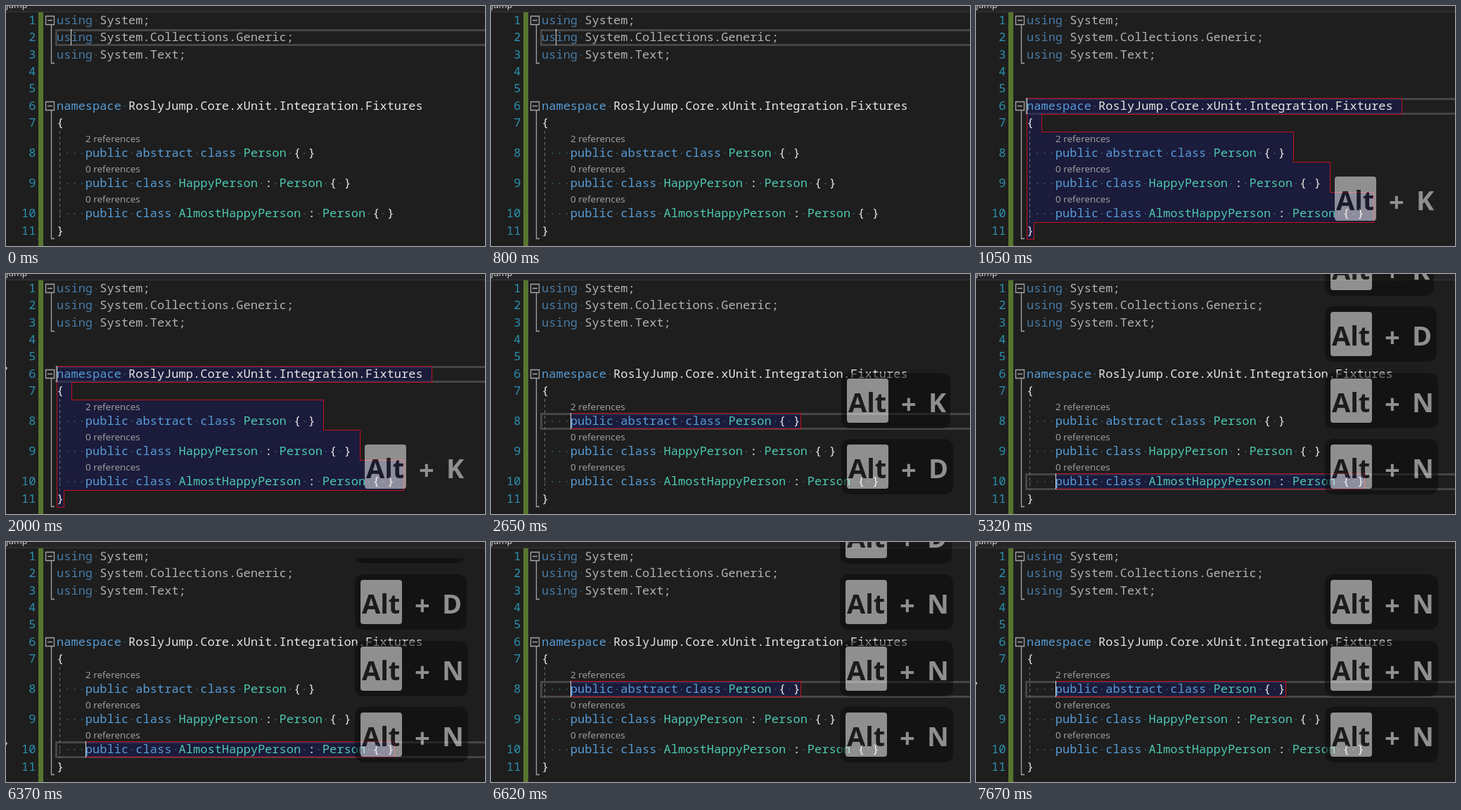
An HTML page for the animation above (8 s loop, 681 px wide and 342 px high).

```html
<!DOCTYPE html>
<html lang="en">
<head>
<meta charset="utf-8">
<title>Code navigation</title>
<style>
  html, body { margin: 0; width: 100%; height: 100%; overflow: hidden; background: #1e1e1e; }
  svg { display: block; width: 681px; height: 342px; }
  .code { font: 500 17.03px "Noto Sans Mono", monospace; fill: #e6e6e6; }
  .number { fill: #2b91af; text-anchor: end; }
  .keyword { fill: #569cd6; }
  .type { fill: #4ec9b0; }
  .space { fill: #2c5468; }
  .unused { opacity: .74; }
  .lens { font: 13.5px "Open Sans", sans-serif; fill: #a6a6a6; }
  .outline { fill: none; stroke: #a5a5a5; stroke-width: 1.3; }
  .key { font: bold 38px "Open Sans", sans-serif; fill: #fff; }
</style>
</head>
<body>
<svg viewBox="0 0 681 342">
  <rect width="681" height="342" fill="#1e1e1e"/>
  <rect width="681" height="8" fill="#252526"/>
  <rect y="8" width="681" height="1" fill="#38383c"/>
  <text y="3" font-family="Open Sans, sans-serif" font-size="12.5" fill="#ddd">Jump</text>
  <g id="under"></g>
  <path d="M76.5 178V308" stroke="#707070" stroke-dasharray="4 4"/>
  <rect x="46" y="9" width="7" height="333" fill="#577430"/>
  <g class="outline">
    <path d="M56.5 14.5h12v12h-12zM59 20.5h7M64.5 27V81.5H69"/>
    <path d="M56.5 136.5h12v12h-12zM59 142.5h7M64.5 149V331.5H69"/>
  </g>
  <g id="code" class="code"></g>
  <g id="over"></g>
</svg>
<script>
const LOOP = 8000;
const CHAR = 10.218, TEXT_X = 72;

// Vertical centre of each editor line
const lineY = [0, 20, 44, 69, 93, 117, 142, 166, 209, 252, 295, 320];
const source = [
  '', 'using System;', 'using System.Collections.Generic;', 'using System.Text;', '', '',
  'namespace RoslyJump.Core.xUnit.Integration.Fixtures', '{',
  '    public abstract class Person { }',
  '    public class HappyPerson : Person { }',
  '    public class AlmostHappyPerson : Person { }', '}'
];
const lenses = { 8: '2 references', 9: '0 references', 10: '0 references' };

const steps = [
  { at: 0, line: 2, keys: '' },
  { at: 1050, line: 6, keys: 'K', bare: true },
  { at: 2650, line: 8, keys: 'KD' },
  { at: 4140, line: 9, keys: 'KDN' },
  { at: 5200, line: 10, keys: 'KDNN', bare: true },
  { at: 5320, line: 10, keys: 'KDNN' },
  { at: 6000, line: 10, keys: 'KDNN', fade: .25 },
  { at: 6120, line: 10, keys: 'KDNN', fade: 0 },
  { at: 6620, line: 8, keys: 'DNNN' },
  { at: 7520, line: 8, keys: 'DNNN', fade: .25 },
  { at: 7670, line: 8, keys: 'NNN' }
];
const caretOff = [[270, 800], [1480, 2000], [3090, 3610], [4670, 5200], [5750, 6370], [7150, 7670]];
const hintOn = [[1600, 2650], [3090, 4140], [4670, 5200], [5750, 6620], [7150, 8000]];
const within = (ranges, t) => ranges.some(([from, to]) => t >= from && t < to);

const byId = id => document.getElementById(id);
const rect = (x, y, w, h, attrs) => `<rect x="${x}" y="${y}" width="${w}" height="${h}" ${attrs}/>`;
const span = (cls, text) => `<tspan class="${cls}">${text}</tspan>`;

function highlight(text) {
  return text.replace(/\b(using|namespace|public|abstract|class)\b|(\w*Person)|( +)/g,
    (all, keyword, type) => keyword ? span('keyword', all)
      : type ? span('type', all) : span('space', '·'.repeat(all.length)));
}

byId('code').innerHTML = source.map((text, i) => {
  if (!i) return '';
  const base = lineY[i] + 6;
  const lens = lenses[i] ? `<text class="lens" x="113" y="${lineY[i] - 15.5}">${lenses[i]}</text>` : '';
  return `<text class="number" x="42.5" y="${base}">${i}</text>${lens}
    <text class="${i < 4 ? 'unused' : ''}" x="${TEXT_X}" y="${base}">${highlight(text)}</text>`;
}).join('');

function selection(line) {
  const style = 'fill="#17175a" fill-opacity=".48" stroke="#c4101a"';
  if (line === 2) return '';
  if (line === 6) {
    return `<path ${style} d="M72.5 131.5H605.5V154.5H93.5V179.5H451.5V222.5H503.5V265.5H565.5V308.5H82.5V332.5H72.5Z"/>`;
  }
  const width = Math.round((source[line].length - 4) * CHAR);
  return rect(113.5, lineY[line] - 10.5, width, 22, style);
}

const popupWidth = { K: 155, D: 159, N: 161 };

function popup(key, x, y, showBack, contentAlpha) {
  const back = showBack ? rect(0, 0, popupWidth[key], 79, 'rx="12" fill="#0a0a0a"') : '';
  return `<g transform="translate(${x} ${y})" opacity="${.5 * contentAlpha}">${back}
    ${rect(8, 8, 59, 63, 'rx="4" fill="#fff"')}
    <text class="key" x="10" y="56" style="fill:#1a1a1a">Alt</text>
    <text class="key" x="85" y="58">+</text>
    <text class="key" x="124" y="56">${key}</text></g>`;
}

function popups({ keys, bare, fade = 1 }) {
  const left = 657 - Math.max(...[...keys].map(k => popupWidth[k]));
  return [...keys].map((key, i) => {
    const last = i === keys.length - 1;
    const y = 235 - Math.floor(94.5 * (keys.length - 1 - i));
    const alpha = i ? 1 : fade;
    // A vanished popup leaves its lower rim behind for a moment
    const rim = alpha < 1
      ? `<path opacity="${.4 * (1 - alpha)}" d="M${left} 23h${popupWidth[key]}q-3 7-12 7H${left + 12}q-9 0-12-7"/>` : '';
    return popup(key, left, y, !(bare && last), alpha) + rim;
  }).join('');
}

let shown = '';
function draw() {
  const t = performance.now() % LOOP;
  const step = steps.findLast(s => s.at <= t);
  const caret = !within(caretOff, t), hint = within(hintOn, t);
  const state = [step.at, caret, hint].join();
  if (state !== shown) {
    shown = state;
    const { line } = step, y = lineY[line];
    const caretX = line === 2 ? 92 : line === 6 ? 72 : 113;
    byId('under').innerHTML =
      rect(71.5, y - 9.5, 620, 21, 'fill="none" stroke="#464646" stroke-width="3"') + selection(line);
    byId('over').innerHTML =
      (caret ? rect(caretX, y - 11, 1, 23, 'fill="#dcdcdc"') : '') +
      (hint ? `<path d="M0 ${y - 10}l2 2-2 3z" fill="#d0d0d0"/>` : '') + popups(step);
  }
  requestAnimationFrame(draw);
}
draw();
</script>
</body>
</html>
```
